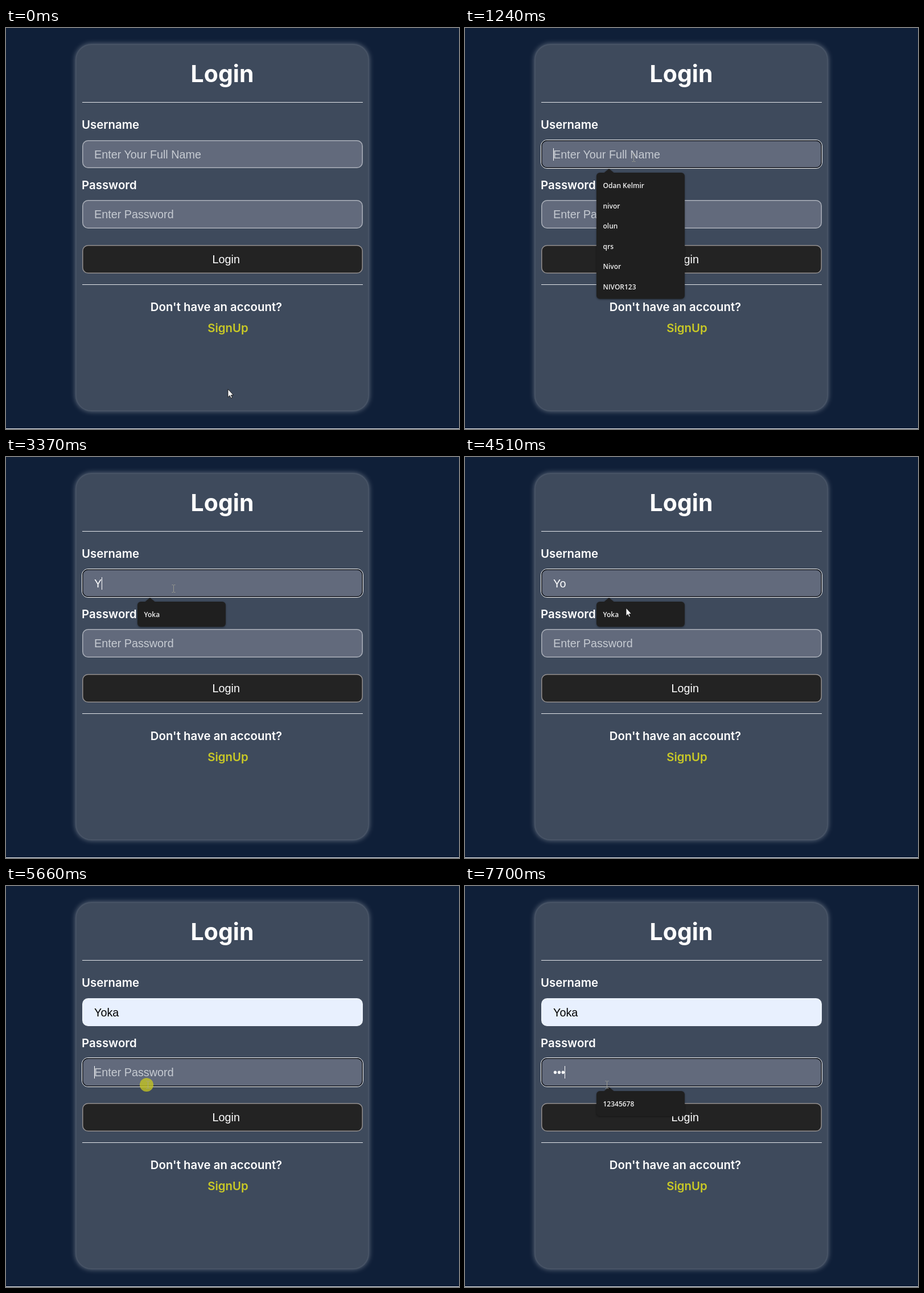
An HTML page that plays this animation: 796x704 px, repeating every 8000 ms.

```html
<!DOCTYPE html>
<html lang="en">
<head>
<meta charset="utf-8">
<title>Login</title>
<style>
  html, body { margin: 0; width: 100%; height: 100%; overflow: hidden; background: #0f1f38; }
  svg { display: block; }
  text { fill: #fff; }
  .title { font: 700 41px Inter, sans-serif; }
  .label { font: 600 20.4px Inter, sans-serif; }
  .input { font: 19.8px "Liberation Sans", Arial, sans-serif; }
  .option { font: 600 12px "Open Sans", sans-serif; fill: #f0f0f0; }
  .middle { text-anchor: middle; }
  .glow { fill: #fff; opacity: .36; filter: blur(5px); }
  #popup { filter: drop-shadow(0 1px 1.5px rgba(0, 0, 0, .45)); }
</style>
</head>
<body>
<svg width="796" height="704" viewBox="0 0 796 704">
  <rect width="796" height="704" fill="#0f1f38"/>
  <rect y="703" width="796" height="1" fill="#f4f5f7"/>
  <rect class="glow" x="122" y="28" width="516" height="645" rx="28"/>
  <rect x="123" y="29" width="514" height="643" rx="27" fill="#3e4a5c" stroke="#475365" stroke-width="2"/>

  <text class="title middle" x="380" y="95">Login</text>
  <path d="M134 130.5H627M134 450.5H627" stroke="#e4e7eb"/>
  <text class="label" x="133" y="177">Username</text>
  <text class="label" x="133" y="283">Password</text>

  <g id="user"></g>
  <g id="pass"></g>

  <rect x="134.75" y="381.75" width="491.5" height="48.5" rx="9.5" fill="#232323" stroke="#949090" stroke-width="1.5"/>
  <text class="input" x="362.5" y="413">Login</text>
  <text class="label middle" x="369.5" y="497">Don't have an account?</text>
  <text class="label middle" x="390" y="534" style="fill:#c9c926">SignUp</text>

  <g id="popup"></g>
  <circle id="press" r="12" fill="#c8c81e" opacity=".76"/>
  <path id="arrow" d="M0 0V14.2L3.2 11.2L5.4 16L7.5 15L5.4 10.4H9.6Z" fill="#fff" stroke="#111" stroke-width=".9"/>
  <path id="beam" d="M-3 -6.5H-1L0 -5.5L1 -6.5H3M-3 6.5H-1L0 5.5L1 6.5H3M0 -5.5V5.5" fill="none" stroke="#a5a695" opacity=".8"/>
</svg>
<script>
const LOOP = 8000, BLINK = 530, TICK = 70, PRESS = 230;
const NAME = "Yoka";
const HISTORY = ["Odan Kelmir", "nivor", "olun", "qrs", "Nivor", "NIVOR123"];

// The story: clicks, keystrokes and the suggestion preview
const USER_CLICK = 970, PICK = 4850, PASS_CLICK = 5660;
const USER_KEYS = [3370, 3570], PASS_KEYS = [6590, 6990, 7490];
const HOVER = 4580, FILL = 5050;
const WAKES = [USER_CLICK, ...USER_KEYS, FILL, PASS_CLICK, ...PASS_KEYS];

const MOVES = [
  { start: 270, end: 770, steps: 8, from: [390, 634], bend: [450, 430], to: [294, 228] },
  { start: 2430, end: 2830, steps: 5, from: [294, 228], to: [292, 231] },
  { start: 4370, end: 4580, steps: 4, from: [292, 231], to: [281, 271] },
  { start: 5190, end: 5660, steps: 7, from: [281, 271], to: [247, 349] },
];

const $ = id => document.getElementById(id);
const clamp = v => Math.max(0, Math.min(1, v));
const within = (v, a, b) => v >= a && v < b;
const count = (t, times) => times.filter(at => t >= at).length;
const last = (t, times) => times.findLast(at => t >= at);
const show = (el, on) => el.style.display = on ? "" : "none";
const moveTo = (el, x, y) => el.setAttribute("transform", `translate(${x} ${y})`);

function buildField(el, y, h, base, hint) {
  el.innerHTML = `
    <rect x="133.5" y="${y - .5}" width="494" height="${h + 1}" rx="10.5" fill="none" stroke="#fff"/>
    <rect x="134.75" y="${y + .75}" width="491.5" height="${h - 1.5}" rx="9.5" stroke-width="1.5"/>
    <text class="input" x="155" y="${base}"></text>
    <rect y="${base - 18}" width="1" height="22"/>`;
  const [ring, box, text, caret] = el.children;
  return (value, focus, filled, caretOn) => {
    show(ring, focus);
    box.setAttribute("fill", filled ? "#e8f0fe" : "#626a7c");
    box.setAttribute("stroke", focus ? "#12151b" : filled ? "#eef3fe" : "#abb0ba");
    text.textContent = value || hint;
    text.style.fill = !value ? "#c6cbd2" : filled ? "#000" : "#fff";
    show(caret, caretOn);
    caret.setAttribute("x", Math.floor(155 + (value && text.getComputedTextLength())));
    caret.setAttribute("fill", filled ? "#000" : "#fff");
  };
}

const drawUser = buildField($("user"), 197, 49, 229, "Enter Your Full Name");
const drawPass = buildField($("pass"), 302, 50, 334, "Enter Password");

function drawPopup(top, items, hot, alpha) {
  const el = $("popup"), h = items.length * 35.5 + 8.5;
  const closing = hot && alpha < 1;
  const row = hot ? `<rect x="234" y="${top + 4}" width="149" height="35.5" rx="2" fill="#353535"/>
    <path d="M360 ${top + 18}l8 8m0 -8l-8 8" stroke="#b8b8b8" stroke-width="1.3"/>` : "";
  const texts = items.map((s, i) =>
    `<text class="option" x="242.5" y="${top + 27 + i * 35.5}" opacity="${closing ? .7 : 1}">${s}</text>`);
  const html = `<path d="M244 ${top + .5}L253 ${top - 7}L262 ${top + .5}Z" fill="#1f1f1f"/>
    <rect x="231" y="${top}" width="155" height="${h}" rx="6" fill="#1f1f1f"/>` + row + texts.join("");
  if (el.markup !== html) el.innerHTML = el.markup = html;
  el.style.transformOrigin = `308px ${top + h / 2}px`;
  el.style.transform = closing ? "scale(.965)" : "none";
  el.style.opacity = alpha;
}

// The list shows after the first click, fades when a row is picked,
// and blinks out and back after each further password key.
function popupAlpha(t) {
  if (t < PASS_CLICK) return t < USER_CLICK + TICK ? 0 : t < FILL + TICK ? 1 : t < FILL + 2 * TICK ? .7 : 0;
  const keys = count(t, PASS_KEYS);
  if (!keys) return 0;
  const age = t - last(t, PASS_KEYS);
  return keys === 1 ? clamp(.5 + age / TICK / 2) : clamp(Math.abs(age - 105) / 105);
}

function pointer(t) {
  const { start, end, steps, from, to, bend } = MOVES.findLast(m => t >= m.start) || MOVES[0];
  const k = clamp((Math.floor((t - start) / (end - start) * (steps - 1) + 1e-6) + 1) / steps);
  const s = k * k * (3 - 2 * k);
  return from.map((p, i) => {
    const q = to[i], c = bend ? bend[i] : (p + q) / 2;
    return Math.round((1 - s) ** 2 * p + 2 * s * (1 - s) * c + s * s * q);
  });
}

function draw(t) {
  const onPass = t >= PASS_CLICK, filled = t >= HOVER;
  const typed = count(t, USER_KEYS), dots = count(t, PASS_KEYS);
  const lit = t >= USER_CLICK && !within(t, HOVER, FILL) &&
    Math.floor((t - last(t, WAKES)) / BLINK) % 2 === 0;

  drawUser(filled ? NAME : NAME.slice(0, typed), t >= USER_CLICK && !onPass, filled, lit && !onPass);
  drawPass("•".repeat(dots), onPass, false, lit && onPass);
  drawPopup(onPass ? 360 : 254, onPass ? ["12345678"] : typed ? [NAME] : HISTORY,
    filled && !onPass, popupAlpha(t));

  const [x, y] = pointer(t);
  const overField = within(x, 134, 627) && (within(y, 197, 246) || within(y, 302, 352));
  show($("arrow"), !overField);
  show($("beam"), overField);
  show($("press"), [USER_CLICK, PICK, PASS_CLICK].some(at => within(t, at, at + PRESS)));
  moveTo($("arrow"), x, y);
  moveTo($("beam"), x + 2.5, y);
  moveTo($("press"), x, y);
}

const start = performance.now();
function frame() {
  draw((performance.now() - start) % LOOP);
  requestAnimationFrame(frame);
}
frame();
</script>
</body>
</html>
```
